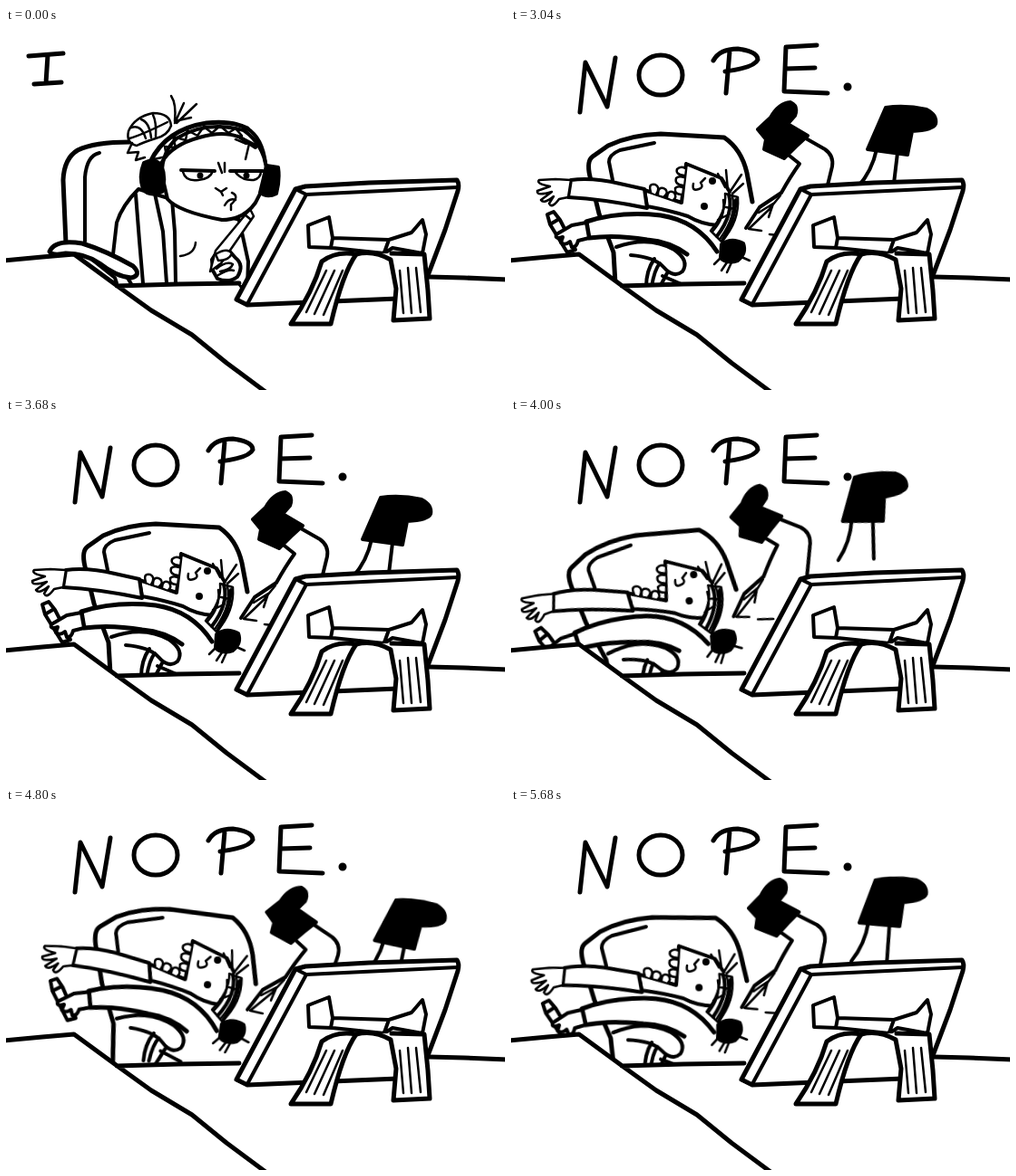
An HTML page for the animation above (5760 ms loop, 550 by 400 pixels).

```html
<!DOCTYPE html>
<html lang="en">
<head>
<meta charset="utf-8">
<title>I should work. Nope.</title>
<style>
  html, body { margin: 0; width: 100%; height: 100%; overflow: hidden; background: #fff; }
  svg { display: block; width: 100vw; height: 100vh; }
  path, ellipse { fill: none; stroke: #000; stroke-width: 4; stroke-linecap: round; stroke-linejoin: round; }
  .bold path, .bold ellipse, path.bold { stroke-width: 5; }
  .fine path, path.fine { stroke-width: 2.5; }
  path.paper { fill: #fff; }
  path.ink, ellipse.ink { fill: #000; }
  path.mask { fill: #fff; stroke: none; }

  /* One loop is 5760 ms; the rocking repeats every 640 ms (nine times per loop). */
  .calm, .should, .work, .nope { animation: calm 5760ms step-end infinite; }
  .should { animation-name: should; }
  .work { animation-name: work; }
  .nope { animation-name: nope; }
  .hand { animation: tap 5760ms step-end infinite; transform-origin: 250px 282px; }
  .rock { animation: rock 640ms -160ms step-end infinite; transform-origin: 240px 315px; }

  @keyframes calm { 0% { visibility: visible } 52.77%, 100% { visibility: hidden } }
  @keyframes nope { 0% { visibility: hidden } 52.77%, 100% { visibility: visible } }
  @keyframes should { 0% { visibility: hidden } 9.72% { visibility: visible } 52.77%, 100% { visibility: hidden } }
  @keyframes work { 0% { visibility: hidden } 15.27% { visibility: visible } 52.77%, 100% { visibility: hidden } }
  @keyframes tap {
    0%, 20.83%, 100% { transform: none }
    15.27%, 18.05% { transform: rotate(-4deg) }
    16.66%, 19.44% { transform: rotate(3deg) }
  }
  @keyframes rock {
    0%, 100% { transform: none }
    12.49% { transform: rotate(-2.8deg) }
    24.99% { transform: rotate(-6.6deg) }
    37.49% { transform: rotate(-9.7deg) }
    49.99% { transform: rotate(-8.2deg) }
    62.49% { transform: rotate(-2deg) }
    74.99% { transform: rotate(4.4deg) }
    87.49% { transform: rotate(2.1deg) }
  }
</style>
</head>
<body>
<svg viewBox="0 0 550 400" role="img" aria-label="I should work. Nope.">

  <!-- Lettering -->
  <g class="bold">
    <path class="calm" d="M25 31L63 28M46 30L44 61M31 62L61 60"/>
    <g class="should">
      <path d="M121 27Q104 30 104 35Q107 39 116 41Q127 49 104 55M131 27L134 54M148 26L149 53M133 42L148 38"/>
      <ellipse cx="165" cy="40" rx="9.5" ry="12"/>
      <path d="M181 29Q182 53 190 53Q201 51 201 27M207 26L209 52L220 50M228 28L229 51M223 28Q243 25 243 37Q242 48 227 51"/>
    </g>
    <g class="work">
      <path d="M281 30L287 54L296 37L305 54L313 25"/>
      <ellipse cx="328" cy="39" rx="10" ry="12"/>
      <path d="M350 24L352 53M348 25Q367 20 366 29Q363 37 353 40L369 50M380 23L382 50M400 21L383 38L401 47"/>
    </g>
    <g class="nope">
      <path d="M76 93L82 38L106 87L115 33"/>
      <ellipse cx="165" cy="52" rx="24" ry="22"/>
      <path d="M223 36Q230 23 250 23Q272 26 272 35Q268 44 236 48M241 26L237 72M303 21L337 19M303 21L301 70L349 72M302 45L335 44"/>
      <ellipse class="ink" cx="371" cy="65" rx="2" ry="2"/>
    </g>
  </g>

  <!-- Sitting upright -->
  <g class="calm">
    <path class="bold" d="M66 238L63 168Q64 144 79 135Q97 126 137 126"/>
    <path d="M87 236L87 165Q89 141 103 138"/>
    <path class="paper" d="M146 178Q128 196 122 215L118 250L140 286H266L267 258L257 212Z"/>
    <path d="M143 184L147 235L151 282M164 183L173 225L177 282M183 190L186 225L187 282"/>
    <path class="fine" d="M209 237Q208 250 192 252"/>

    <g class="hand">
      <path class="paper" d="M227 256Q235 241 245 245L253 254Q263 262 255 275Q246 282 233 277L228 268Z"/>
      <path class="paper fine" d="M269 200L231 246L225 269L237 260L273 208Z"/>
      <path class="fine" d="M263 206L269 211"/>
      <path class="paper fine" d="M231 250Q244 242 249 249Q246 257 234 257ZM232 266Q243 257 250 261Q248 267 236 269M234 273Q246 266 251 268"/>
    </g>

    <!-- Head -->
    <path class="paper" d="M172 163L178 189Q190 203 238 212Q262 212 275 193Q288 170 287 154Q283 128 262 113Q220 102 188 122Q171 138 172 163Z"/>
    <g class="fine">
      <path class="paper" d="M144 130Q132 127 135 114Q142 98 162 94Q181 94 182 108Q178 119 165 122Q152 126 144 130"/>
      <path d="M138 110Q149 106 154 122M149 101Q158 104 160 121M162 96Q166 104 165 120M136 122Q150 118 178 104M139 127L134 138L146 137L143 146L153 143"/>
      <path d="M182 75Q188 84 186 103M196 83L186 105M210 84L188 105M186 103L204 99"/>
      <path d="M163 145L177 142L175 131L187 132L184 120L198 124L200 113L211 119L218 109L227 116L236 108L245 116L253 111L260 119M253 123L265 128M256 119L279 131"/>
    </g>
    <path d="M172 148Q183 129 213 121Q240 113 258 121L275 132"/>
    <path class="bold" d="M159 148Q176 112 221 105Q249 102 266 111"/>
    <path d="M266 111Q283 122 286 150"/>
    <path class="fine" d="M268 128L264 145"/>
    <path class="ink" d="M152 149Q163 143 171 151Q177 166 172 181Q158 187 151 178Q146 163 152 149ZM287 152L300 154Q302 168 298 183Q288 188 280 182Q284 166 287 152Z"/>
    <path d="M193 157L230 158M247 158L283 158"/>
    <g class="fine">
      <path d="M195 159Q198 170 212 168Q225 167 228 158M252 158Q259 169 273 168Q281 166 281 158M234 149L238 160M241 149L241 159M231 177L237 181L243 177M237 181L239 185M241 196Q246 187 253 190M249 182Q258 186 248 195L248 201"/>
      <ellipse class="ink" cx="214" cy="163" rx="1.5" ry="1.5"/>
      <ellipse class="ink" cx="265" cy="163" rx="1.5" ry="1.5"/>
    </g>
  </g>

  <!-- Flailing backwards -->
  <g class="nope"><g class="rock">
    <path class="mask" d="M116 300L113 248L97 205L87 164L86 146L165 117L235 121L265 175L267 240L200 300Z"/>
    <path class="bold" d="M116 300L113 248L97 205L87 164Q83 147 90 142L107 130Q132 118 165 117L235 121Q254 134 260 160L266 192"/>
    <path d="M112 168L108 148Q108 140 120 135L158 127"/>

    <!-- Legs -->
    <path class="mask" d="M327 122L348 134L354 152L345 190L310 240L258 222L298 182L318 150L303 138Z"/>
    <path d="M325 122L346 134Q356 141 354 153L345 190M303 138L318 150Q308 164 298 182L274 198L259 221"/>
    <path class="fine" d="M262 222L284 201L297 185M262 222L276 224M273 204L289 194L284 209M285 228L302 230"/>
    <path class="mask" d="M403 134L394 158L380 176H421L426 138Z"/>
    <path d="M403 134Q398 158 382 176M426 138L421 180"/>
    <path class="ink" d="M272 112L286 99Q295 83 308 82Q317 86 313 97L305 106L327 119L314 131L301 144L279 134L281 123Z"/>
    <path class="ink" d="M413 88Q435 85 458 90Q470 96 468 106Q465 113 442 114L437 140L393 134Z"/>

    <!-- Chair arm and its support -->
    <path class="paper" d="M116 242Q152 229 180 245Q197 257 189 269Q179 277 168 264Q158 253 132 251"/>
    <path d="M149 286Q149 268 158 255M155 286Q158 267 164 260M163 288L172 271M167 274L190 284"/>

    <!-- Head -->
    <path class="mask" d="M193 150L232 166L248 190L238 235L207 217L150 198L147 179L188 193Z"/>
    <path d="M193 150L232 166L241 181M193 150L188 193L147 179L150 197Q177 202 195 208Q210 217 228 218"/>
    <path class="paper fine" d="M154 181Q151 171 159 173Q165 176 160 184M162 184Q162 174 170 178Q174 182 169 186M172 187Q173 178 180 182Q183 187 179 190M191 163Q181 162 183 156Q187 152 192 155M190 174Q180 173 182 166Q185 163 191 165M188 184Q180 184 181 177Q184 174 189 176"/>
    <path class="fine" d="M201 172Q199 181 207 178Q213 176 209 171L214 166"/>
    <ellipse class="ink" cx="222" cy="169" rx="2" ry="2"/>
    <ellipse class="ink" cx="213" cy="197" rx="2" ry="2"/>
    <path class="paper fine" d="M236 183Q238 203 220 224L232 236Q252 214 250 187Z"/>
    <path d="M240 184Q246 205 227 230M248 190Q246 215 233 235"/>
    <path class="fine" d="M234 190Q237 208 222 225M244 186Q249 207 231 232M228 212L240 206M237 198L246 200M239 179L237 157M242 180L254 162M244 183L256 172M236 176L228 161"/>
    <path class="ink" d="M232 239Q243 231 256 238Q260 249 250 257Q238 261 231 254Z"/>
    <path class="fine" d="M254 253L263 257M240 256L232 268M244 257L238 270M232 253L224 261"/>

    <!-- Arms -->
    <path class="paper" d="M66 168Q90 165 120 172L147 178L150 199Q102 189 63 187Z"/>
    <path class="paper fine" d="M66 168L49 167L31 168Q27 172 43 175L29 180Q28 186 45 181L33 190Q36 195 47 186L42 194Q45 200 53 189L63 187Z"/>
    <path class="paper" d="M40 206L47 203L54 212L71 245L62 248L43 217ZM43 217L53 211"/>
    <path class="mask" d="M83 214Q120 202 165 207Q205 213 227 247L222 257L192 249Q175 236 150 234Q115 228 86 232Z"/>
    <path class="bold" d="M227 247Q205 213 165 207Q120 202 83 214L86 232Q115 228 150 234Q175 236 194 250"/>
    <path class="paper" d="M83 215L67 218L50 228Q48 234 57 231L55 237Q59 241 65 236L67 242Q72 243 74 235L86 232Z"/>
  </g></g>

  <!-- Desk -->
  <path class="mask" d="M0 257L75 251L124 286L255 283L270 304L320 302L430 300L468 276L550 278V400H0Z"/>
  <path class="bold" d="M-3 257L40 253L75 250L124 286L160 312L205 339L243 370L286 402M122 285L190 283L257 282M466 275L505 276L553 278"/>
  <path class="calm paper bold" d="M48 247Q54 233 84 238Q110 246 140 263Q150 273 138 276Q122 275 103 260Q87 249 66 249Q51 252 48 247Z"/>
  <path class="calm" d="M95 256L120 276L122 282"/>

  <!-- Monitor -->
  <path class="paper bold" d="M319 178L330 175L400 171L497 168Q500 172 498 180L484 223L464 276L456 298L360 302L266 306L254 300Z"/>
  <path d="M321 179L331 184L498 176M331 184L266 305"/>
  <path class="paper" d="M333 218L356 209L360 232L422 234L447 226L459 212L463 228L459 249L426 243L417 249L360 243L334 242ZM360 232L358 243M422 234L417 248"/>
  <path class="paper bold" d="M348 258Q364 246 386 250Q371 271 358 327L314 327Q338 292 348 258Z"/>
  <path class="paper bold" d="M386 250Q405 245 424 256L430 288L427 323L467 321L465 290L461 250L425 249"/>
  <path class="fine" d="M353 268L331 314M362 268L340 316M371 268L350 317M434 268L438 315M443 265L447 315M452 265L457 314"/>
</svg>
</body>
</html>
```
